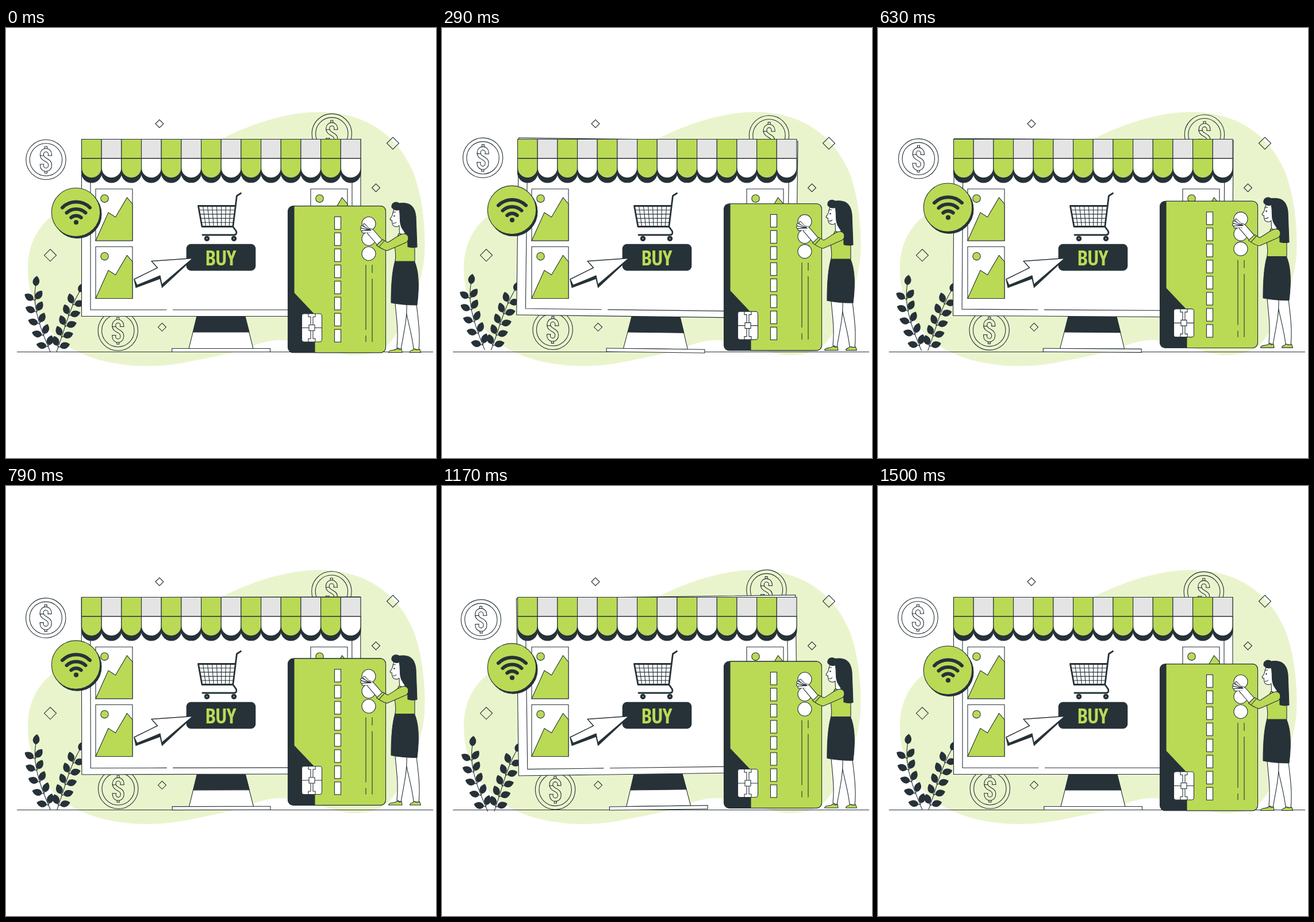
Write an HTML page that moves like this. It is 748 by 748 pixels and loops after 1.54 s.

```html
<!DOCTYPE html>
<html lang="en">
<head>
<meta charset="utf-8">
<title>Online shop</title>
<style>
  html, body { margin: 0; width: 100%; height: 100%; overflow: hidden; background: #fff; }
  svg { display: block; width: 100vw; height: 100vh; stroke: #263238; stroke-width: 1.1; fill: none; }
  .g { fill: #bada55; }
  .w { fill: #fff; }
  .d { fill: #263238; }
  .n { stroke: none; }
  .bg { fill: #eaf4cc; stroke: none; }
  .gray { fill: #e4e4e5; }
  .thick { stroke-width: 2.8; stroke-linecap: round; stroke-linejoin: round; }
  .wifi { stroke-width: 6; stroke-linecap: round; }
  .buy { font: 700 36.5px "Open Sans Condensed", "Roboto Condensed", Roboto, sans-serif; letter-spacing: -1px; text-anchor: middle; }
</style>
</head>
<body>
<svg viewBox="0 0 748 748">
  <defs>
    <g id="photo">
      <path class="w" d="M0 0H64V90H0Z"/>
      <circle class="g" cx="15.5" cy="16.7" r="6.7"/>
      <path class="g" d="M0 90L22 41L34.5 49L54.5 15L64 26V90Z"/>
    </g>
  </defs>

  <path class="bg" d="M38 420C38 370 60 325 130 300C210 272 300 232 375 193C440 160 500 146 545 146C625 147 680 185 708 250C728 300 731 370 727 405C720 455 700 505 670 545C650 568 620 569 600 569C560 566 530 543 475 543C440 544 420 560 370 570C320 580 290 588 245 588C190 588 140 575 105 552C60 520 38 470 38 420Z"/>
  <g id="diamonds"></g>
  <path d="M19 563.5H743"/>

  <g id="sway">
    <g id="coins"></g>
    <g id="plants"></g>
    <path class="w" d="M332 502H416L430 557.5H318Z"/>
    <path class="d" d="M332 502H416L423 529H325.5Z"/>
    <path class="w" d="M288.7 557.5H459.5V563.5H288.7Z"/>
    <path class="w" d="M131.5 193.5H617V501.5H131.5Z"/>
    <path d="M279.5 490.3H147V209H602V490.3H290"/>
  </g>

  <use href="#photo" x="156" y="280"/>
  <use href="#photo" x="156" y="380.5"/>
  <use href="#photo" x="530" y="280"/>
  <g id="awning"></g>

  <g id="cart">
    <path id="mesh"/>
    <path class="thick" d="M408.5 287.5L401.5 292L394.8 345.5L400.5 353.5Q402.5 360 396 360H342M398.5 309.5H334.5L341 345.5H394.8"/>
    <circle class="d" cx="349.5" cy="366.3" r="4.2"/>
    <circle class="d" cx="396.5" cy="366.3" r="4.2"/>
    <circle class="w n" cx="349.5" cy="366.3" r=".9"/>
    <circle class="w n" cx="396.5" cy="366.3" r=".9"/>
  </g>

  <rect class="d n" x="313.7" y="375.8" width="120.6" height="46.4" rx="8"/>
  <text class="g n buy" x="373" y="412.5">BUY</text>
  <path class="d" d="M325 401.5L271.5 451.5L268 436L226 451.5L223 438Z"/>
  <path class="w" stroke-linejoin="round" stroke-width="1.4" d="M325 400.5L253 405.5L263.5 417L223 437L228 447.5L268 431L271 446.5Z"/>

  <g id="float">
    <circle class="d" cx="124" cy="323.7" r="42"/>
    <circle class="g" cx="121.5" cy="320.5" r="42.2"/>
    <path class="wifi" d="M98 312.5A34 34 0 0 1 146 312.5M105.5 321.5A24 24 0 0 1 138.5 321.5M113.3 329.8A13 13 0 0 1 130.7 329.8"/>
    <circle class="d n" cx="122" cy="338" r="4.1"/>

    <rect class="d" x="490.5" y="309.6" width="170" height="255.2" rx="9"/>
    <path class="g" d="M501 309.6H651.5A9 9 0 0 1 660.5 318.6V555.8A9 9 0 0 1 651.5 564.8H537V499L501 461Z"/>
    <rect class="w" x="514.5" y="497" width="35" height="49" rx="4"/>
    <path d="M527 516.5H537V526.5H527ZM514.5 521.5H527M537 521.5H549.5M526 497V502.5H530V516.5M538 497V502.5H534V516.5M526 546V540.5H530V526.5M538 546V540.5H534V526.5"/>
    <g id="card"></g>
    <path d="M626 412V525M626 535V546M637 412V426M637 436V546"/>

    <g id="woman" stroke-linejoin="round">
      <path class="w" d="M694 481C697 505 706 530 709 558L718 560C721 535 717 505 714 481Z"/>
      <path class="w" d="M677 478C679 505 683 525 680 556L687 559C692 530 698 505 697 481Z"/>
      <path class="g" d="M665.5 564.5Q666 561 672 560.5Q678 560 681 557Q683 561 688 558L689 564.5Z"/>
      <path class="g" d="M702.5 564.5Q703 561 707 560.5L710 558Q714 561 719.5 558.5L721.5 564.5Z"/>
      <path class="d" d="M677 405H710C718 422 719 450 715 482Q690 482 670 478C670 450 671 425 677 405Z"/>
      <path class="g" d="M683 358Q694 352 703 358L711 380V406H677Q679 394 675.5 378Z"/>
      <path class="w" d="M676 313C673 319 673 324 671.5 327L668 332.5Q668.5 334.5 671.5 334.5Q671 337 672 339.5Q672 344.5 678 345.5Q682 346 684 343.5L684.5 357Q691 362 697 354L700 315Z"/>
      <path class="d" d="M671 312C670 304 678 301 684 305C700 303 711 308 713 328L715 381Q706 383 699 380.5Q700 362 690 350C683 340 687 327 684 316Q676 319 671 312Z"/>
      <circle class="d n" cx="675.5" cy="327" r="1.3"/>
      <path d="M672.5 321.5Q674.5 319 678 320.5M673 339.5Q677 340.5 679 337.5"/>
      <path class="w" d="M655 369.5L639 351Q630 345 628 353Q628 358 632 361L646 377.5Z"/>
      <g id="fingers" stroke-linecap="round"></g>
      <path class="g" d="M655 368L664 373C676 367 685 357 694 358C702 360 701 370 696 373L664 387Q659 388 644.5 378Z"/>
      <path d="M649 380.5L658 370.5"/>
    </g>
  </g>
</svg>
<script>
const $ = id => document.getElementById(id);
const fill = (id, list, draw) => { $(id).innerHTML = list.map(draw).join(""); };
const range = n => [...Array(n).keys()];

fill("diamonds", [[267, 166.5, 7], [673, 200.5, 10.5], [643.5, 278, 7], [77, 395.3, 10.5], [271.5, 520.3, 7]],
  ([x, y, r]) => `<path d="M${x - r} ${y}l${r} ${-r}l${r} ${r}l${-r} ${r}Z"/>`);

const dollar = "M7 -7V-9.5A7 7 0 0 0 -7 -9.5V-8C-7 1 7 0 7 8.5V10.5A7 7 0 0 1 -7 10.5V8";
fill("coins", [[69.5, 229, "#fff"], [566.8, 183.8, "#eaf4cc"], [194.8, 526.5, "#eaf4cc"]], ([x, y, tone]) => `
  <g transform="translate(${x} ${y})">
    <circle r="34.7"/><circle r="28.2"/>
    <path d="M-2 -16V-23H2V-16M-2 16V23.5H2V16"/>
    <path d="${dollar}" stroke-width="7"/>
    <path d="${dollar}" stroke="${tone}" stroke-width="4.8"/>
    <path d="M-3.3 -7H-10.7M10.7 -7H3.3M-10.7 8H-3.3"/>
  </g>`);

// A stem is a cubic curve; stalked leaves sit on it in pairs and one ends it.
const leaf = ([x, y], deg) =>
  `<g transform="translate(${x} ${y}) rotate(${deg})"><path d="M0 0H5"/>
   <path class="d n" d="M3 0C6 -8 15 -8 21 0C15 8 6 7 3 0Z"/></g>`;
const bez = (a, t) => {
  const u = 1 - t;
  return u * u * u * a[0] + 3 * u * u * t * a[1] + 3 * u * t * t * a[2] + t * t * t * a[3];
};
const plant = ([xs, ys, left, right]) => {
  const at = t => [bez(xs, t), bez(ys, t)];
  const dir = t => {
    const [a, b] = at(t - .02), [c, d] = at(t + .02);
    return Math.atan2(d - b, c - a) * 180 / Math.PI;
  };
  const pairs = [.08, .26, .44, .62, .8].map(t =>
    leaf(at(t), dir(t) - left) + leaf(at(t), dir(t) + right)).join("");
  return `<path d="M${xs[0]} ${ys[0]}C${[1, 2, 3].map(i => xs[i] + " " + ys[i]).join(" ")}"/>`
    + pairs + leaf(at(1), dir(1));
};
fill("plants", [
  [[77, 62, 46, 51], [563, 528, 488, 452], 55, 40],
  [[88, 100, 108, 126], [563, 532, 494, 462], 40, 55]
], plant);

const step = 485.5 / 14;
const flap = (x, drop, cls) =>
  `<path class="${cls}" d="M${x} 227V${drop}a${step / 2} ${step / 2} 0 0 0 ${step} 0V227Z"/>`;
const stripes = range(14).map(i => [131.5 + i * step, i % 2]);
$("awning").innerHTML =
  stripes.map(([x]) => flap(x, 251.5, "d")).join("") +
  stripes.map(([x, odd]) => `<path class="${odd ? "gray" : "g"}" d="M${x} 193.5h${step}V226.5h${-step}Z"/>`
    + flap(x, 243.5, odd ? "w" : "g")).join("");

$("mesh").setAttribute("d",
  range(7).map(i => `M${342.5 + i * 8} 309.5L${347.7 + i * 6.75} 345.5`).join("") +
  range(4).map(i => `M${335.8 + i * 1.3} ${316.7 + i * 7.2}H${397.6 - i * .9}`).join(""));

$("card").innerHTML =
  range(8).map(i => `<rect class="w" x="571.5" y="${328.3 + i * 28}" width="11" height="22"/>`).join("") +
  range(3).map(i => `<circle class="w" cx="631" cy="${340.5 + i * 26}" r="12"/>`).join("");

fill("fingers", [[623, 342.5], [619, 346], [618.5, 350.5], [621, 354.5]], ([x, y]) =>
  `<path d="M${x} ${y}L633 353" stroke-width="5"/><path d="M${x} ${y}L635 354" stroke="#fff" stroke-width="2.9"/>`);

// 24 pictures a second, one 1.5 s cycle plus its closing pose.
const LOOP = 1540, TICK = 1000 / 24, LAST = 36;
const start = performance.now();

function draw(now) {
  const t = Math.max(0, now - start) % LOOP;
  const p = Math.min(LAST, Math.floor((t + 4) / TICK)) / LAST;
  const tilt = .77 * Math.sin(2 * Math.PI * p);
  const lift = 10 * (1 - Math.abs(1 - 2 * p));
  $("sway").setAttribute("transform", `rotate(${tilt} 323 356)`);
  $("float").setAttribute("transform", `translate(0 ${-lift})`);
  requestAnimationFrame(draw);
}
draw(start);
</script>
</body>
</html>
```
